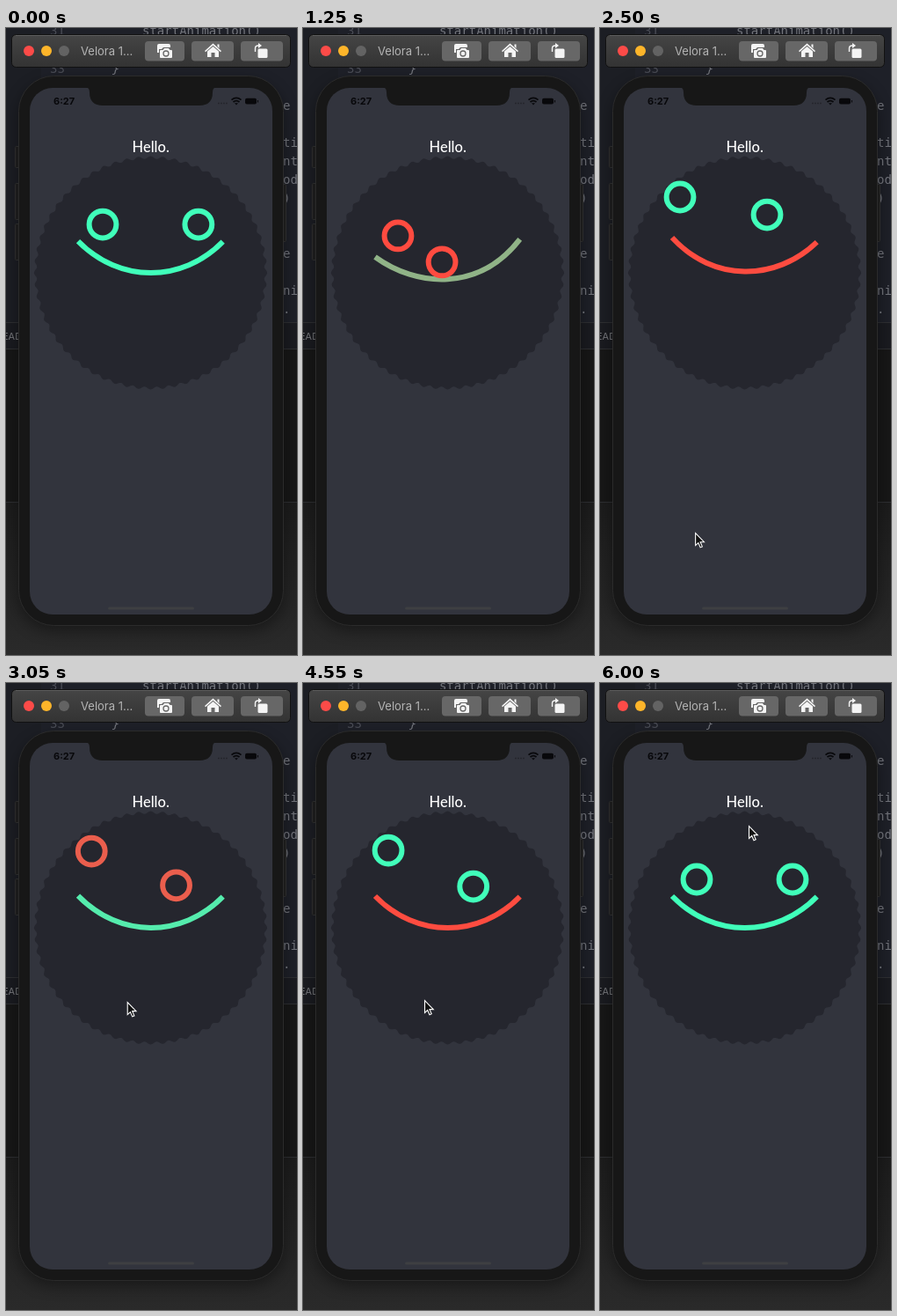
Animation of 331 by 712 pixels, one loop 6.07 s. Source, as an HTML page:

```html
<!DOCTYPE html>
<html lang="en">
<head>
<meta charset="utf-8">
<title>Hello</title>
<style>
html, body { margin: 0; width: 100%; height: 100%; overflow: hidden; background: #1a1a1a; }
svg { display: block; }
.ui { font-family: Inter, "Open Sans", sans-serif; }
.code { font: 14px "DejaVu Sans Mono", monospace; fill: #73757c; white-space: pre; }
.hello { font: 500 16.5px Lato, sans-serif; fill: #fff; }
</style>
</head>
<body>
<svg width="331" height="712" viewBox="0 0 331 712">
  <defs>
    <linearGradient id="bar" x2="0" y2="1"><stop stop-color="#454545"/><stop offset="1" stop-color="#333"/></linearGradient>
    <linearGradient id="desk" x2="0" y2="1"><stop stop-color="#1c1c1c"/><stop offset="1" stop-color="#2a2a2a"/></linearGradient>
    <filter id="blur" x="-20%" width="140%"><feGaussianBlur stdDeviation="9"/></filter>
  </defs>

  <!-- editor and desktop -->
  <rect width="331" height="365" fill="#1c1e24"/>
  <rect x="40" width="291" height="334" fill="#1e2028"/>
  <rect y="334" width="331" height="31" fill="#1a1b20"/>
  <rect y="365" width="331" height="174" fill="#171717"/>
  <rect y="539" width="331" height="173" fill="url(#desk)"/>
  <path d="M0 334.5H331M0 364.5H331M0 538.5H331" stroke="#2e2f32"/>
  <g id="code" class="code">
    <text x="50" y="8" fill="#4a4c55">31</text><text x="155" y="8">startAnimation()</text>
    <text x="50" y="51" fill="#4a4c55">33</text><text x="121" y="51" font-style="italic">}</text>
  </g>
  <text class="ui" x="-4" y="354" font-size="11" fill="#77787c">EAD</text>
  <rect x="14" y="62" width="302" height="622" rx="40" opacity=".4" filter="url(#blur)"/>

  <!-- phone -->
  <g fill="#1b1b1b" stroke="#2b2b2b">
    <rect x="10.5" y="134.5" width="5" height="24" rx="1"/>
    <rect x="10.5" y="176.5" width="5" height="41" rx="1"/>
    <rect x="10.5" y="222.5" width="5" height="41" rx="1"/>
    <rect x="314.5" y="177.5" width="4" height="65" rx="1"/>
    <rect x="14.5" y="54.5" width="301" height="624" rx="40" fill="#171717"/>
  </g>
  <rect x="27" y="68" width="276" height="598" rx="26" fill="#32343d"/>
  <path d="M91 67Q95 68 95 73Q95 88 110 88H220Q235 88 235 73Q235 68 239 67Z" fill="#171717"/>
  <text class="ui" x="54" y="87" font-size="11" font-weight="700" fill="#08080b">6:27</text>
  <path d="M241 85.5H252" stroke="#24252c" stroke-width="1.5" stroke-dasharray="1.8 1.2"/>
  <g fill="none" stroke="#08080b" stroke-width="1.8">
    <path d="M256.5 81.6Q262 77.2 267.5 81.6M258.5 84Q262 81.2 265.5 84"/>
    <path d="M260 85.2H264L262 87.5Z" fill="#08080b" stroke="none"/>
    <rect x="272" y="79.8" width="13" height="6.8" rx="2" fill="#08080b" stroke="none"/>
    <path d="M286.5 82V84.500" stroke-width="1"/>
  </g>
  <rect x="116" y="657.5" width="98" height="3" rx="1.5" fill="#3e3f42"/>
  <path id="badge" fill="#25262e"/>
  <text class="hello" x="164.700" y="141" text-anchor="middle">Hello.</text>

  <!-- window bar -->
  <rect x="6.5" y="7.5" width="317" height="37" rx="5" fill="url(#bar)" stroke="#111"/>
  <path d="M11 8.5H319" stroke="#5c5c5c"/>
  <circle cx="26" cy="26" r="6" fill="#fc4b48"/>
  <circle cx="46" cy="26" r="6" fill="#fdb52a"/>
  <circle cx="66" cy="26" r="6" fill="#636363"/>
  <text class="ui" x="85" y="31" font-size="13" fill="#b4b4b4">Velora 1...</text>
  <g fill="#676767">
    <rect x="158" y="15" width="45" height="22.5" rx="4"/>
    <rect x="211" y="15" width="48" height="22.5" rx="4"/>
    <rect x="267" y="15" width="48" height="22.5" rx="4"/>
  </g>
  <g fill="#f4f4f4">
    <path d="M172 28V20Q172 18 174 18H185Q187 18 187 20V22H179L177 24H174V28Z"/>
    <path d="M176 25H178.5L180 23H185L186.5 25H188Q189 25 189 26V33Q189 34 188 34H176Q175 34 175 33V26Q175 25 176 25Z"/>
    <circle cx="182" cy="29" r="3" fill="none" stroke="#676767" stroke-width="1.3"/>
    <path d="M226 26L235.5 17.5L245 26L244 27.2L235.5 19.7L227 27.2Z"/>
    <path d="M229 26.5L235.5 21L242 26.5V33H237.5V28H233.5V33H229ZM240.5 18.5H242.5V23L240.5 21Z"/>
    <rect x="286.500" y="23.500" width="11" height="10.500" rx="1.5"/>
    <path d="M283.5 27V23Q283.5 20 287 20H288" fill="none" stroke="#f4f4f4" stroke-width="1.4"/>
    <path d="M287 17L291 20L287 23Z"/>
  </g>

  <!-- face -->
  <g fill="none" stroke-width="6">
    <path id="mouth"/>
    <g id="eyes"><circle r="15.4"/><circle r="15.4"/></g>
  </g>
  <path id="cursor" d="M.5 .5V14.500L3.700 11.500L6 16.800L8.200 15.800L6 10.600H10.300Z" fill="#111" stroke="#fff" stroke-width="1.1"/>
</svg>
<script>
const $ = id => document.getElementById(id);
const LOOP = 6070;
const GREEN = [64, 255, 186], RED = [255, 75, 64];

// Stops of the face; the eyes turn red at every second one.
const poses = [
  {t: 0, eyes: [110, 223, 219, 223], tilt: 0, red: 0},
  {t: 1250, eyes: [108, 236, 158, 266], tilt: 18, red: .42},
  {t: 2500, eyes: [91, 192, 190, 212], tilt: -4, red: 1},
  {t: 3550, eyes: [98, 191, 194, 232], tilt: 0, red: 0},
  {t: 4550, eyes: [97, 190, 194, 231], tilt: 0, red: 1},
  {t: 5370, eyes: [114, 220, 116, 252], tilt: 7, red: .08},
  {t: 6000, eyes: [110, 223, 219, 223], tilt: 0, red: 0}
];
const face = poses.map((p, i) => ({t: p.t, v: [...p.eyes, p.tilt, p.red, i % 2]}));
const pointer = [
  {t: 2500, v: [108, 574]},
  {t: 3200, v: [138, 360]},
  {t: 5050, v: [138, 360]},
  {t: 5370, v: [161, 169]},
  {t: 6000, v: [169, 162]}
];

const easeOut = p => 1 - (1 - p) ** 3;

function sample(stops, t) {
  const next = stops.findIndex(s => s.t > t);
  if (next < 1) return stops.at(next).v;
  const a = stops[next - 1], b = stops[next];
  const e = easeOut((t - a.t) / (b.t - a.t));
  return a.v.map((v, i) => v + (b.v[i] - v) * e);
}

const tint = red => `rgb(${GREEN.map((v, i) => Math.round(v + (RED[i] - v) * red))})`;

const place = (el, x, y) => el.setAttribute('transform', `translate(${x} ${y})`);

function drawBadge() {
  const teeth = 60, steps = teeth * 8;
  const points = Array.from({length: steps}, (_, i) => {
    const a = i / steps * 2 * Math.PI, r = 131 + 1.6 * Math.cos(a * teeth);
    return `${(164.5 + r * Math.cos(a)).toFixed(2)} ${(278 + r * Math.sin(a)).toFixed(2)}`;
  });
  $('badge').setAttribute('d', `M${points.join('L')}Z`);
}

// Code lines showing past the right edge of the phone, by line number.
function drawCode() {
  const lines = {2: 'e', 4: 'ti', 5: 'nt', 6: 'od', 7: ')', 10: 'e', 12: 'ni', 13: ' .'};
  for (const [row, text] of Object.entries(lines)) {
    const el = document.createElementNS('http://www.w3.org/2000/svg', 'text');
    el.textContent = text;
    el.setAttribute('x', 315);
    el.setAttribute('y', 51 + row * 21);
    $('code').append(el);
  }
}

function draw(t) {
  const [ax, ay, bx, by, tilt, mouthRed, eyeRed] = sample(face, t);
  const [left, right] = $('eyes').children;
  place(left, ax, ay);
  place(right, bx, by);
  $('eyes').setAttribute('stroke', tint(eyeRed));
  $('mouth').setAttribute('stroke', tint(mouthRed));
  $('mouth').setAttribute('d',
    `M82 ${242 + tilt}C129 ${290 + tilt * .22} 200 ${290 + tilt * .56} 246.7 ${242.6 - tilt * .15}`);
  place($('cursor'), ...sample(pointer, t));
  $('cursor').setAttribute('visibility', t < 2200 ? 'hidden' : 'visible');
}

const start = performance.now();
function tick() {
  draw((performance.now() - start) % LOOP);
  requestAnimationFrame(tick);
}

drawBadge();
drawCode();
tick();
</script>
</body>
</html>
```
